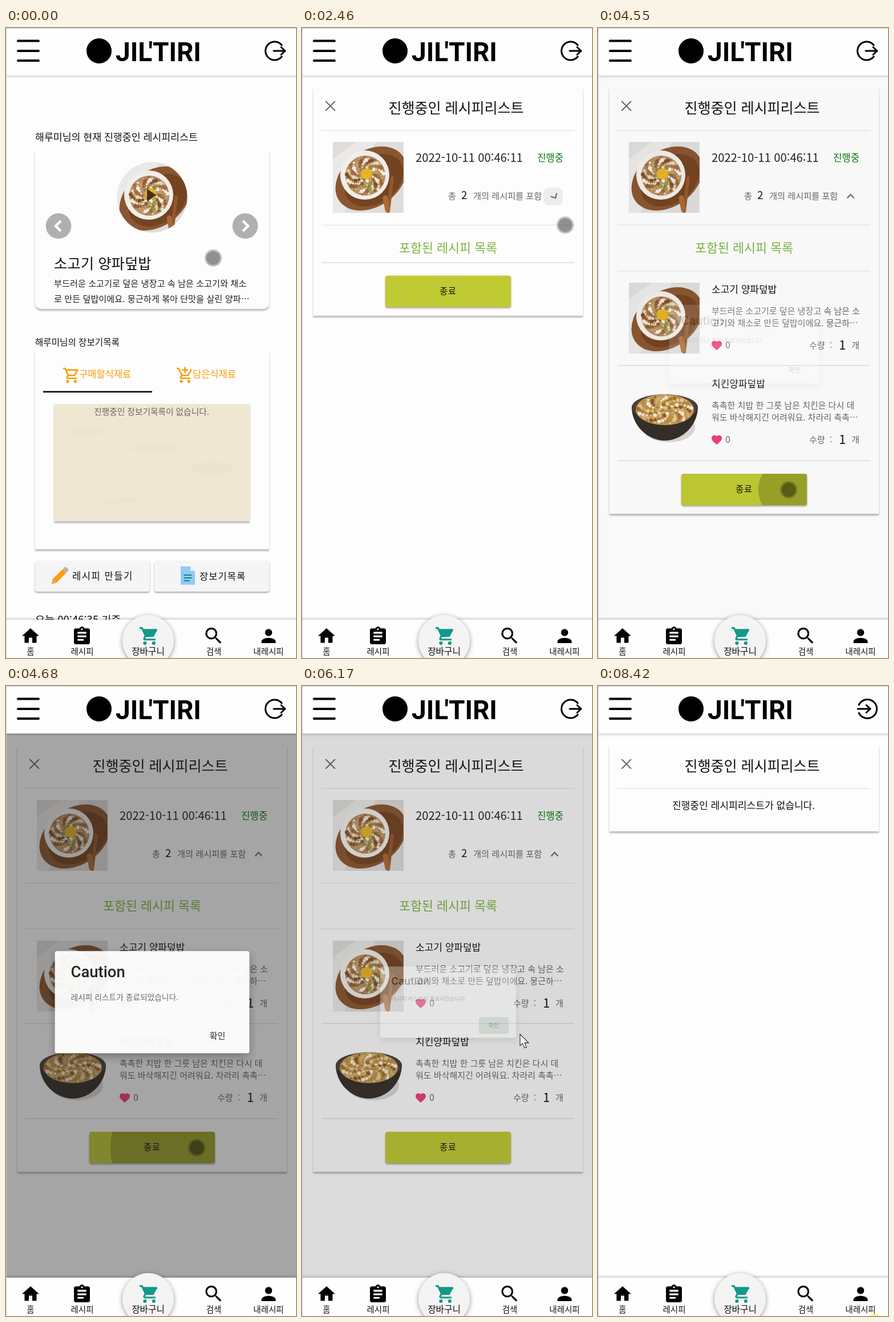
An HTML page for the animation above (8.49 s loop, 508x1101 px).

```html
<!DOCTYPE html>
<html lang="ko">
<head>
<meta charset="utf-8">
<title>레시피 리스트</title>
<style>
html, body { margin: 0; width: 100%; height: 100%; overflow: hidden; background: #fefefe }
svg { position: fixed; left: 0; top: 0; display: block }
text { font-family: "Noto Sans CJK KR", "Noto Sans CJK", sans-serif; font-weight: 300; white-space: pre }
.card { fill: #fdfdfd; filter: drop-shadow(0 3px 1.5px rgba(0,0,0,.28)) }
.btn { filter: drop-shadow(0 2px 1.5px rgba(0,0,0,.35)) }
.bar { fill: #fefefe; filter: drop-shadow(0 0 3px rgba(0,0,0,.35)) }
.line { fill: none; stroke: #000; stroke-linecap: round; stroke-linejoin: round }
#touch { mix-blend-mode: multiply }
</style>
</head>
<body>
<svg id="stage" width="508" height="1101" viewBox="0 0 508 1101"></svg>
<script>
const wheels = 'M7 18a2 2 0 1 0 0 4 2 2 0 0 0 0-4zM17 18a2 2 0 1 0 0 4 2 2 0 0 0 0-4z';
const icons = {
  home: 'M10 20v-6h4v6h5v-8h3L12 3 2 12h3v8z',
  clip: 'M19 3h-4.18C14.4 1.84 13.3 1 12 1s-2.4.84-2.82 2H5c-1.1 0-2 .9-2 2v14c0 1.1.9 2 2 2h14c1.1 0 2-.9 2-2V5c0-1.1-.9-2-2-2zm-7 0c.55 0 1 .45 1 1s-.45 1-1 1-1-.45-1-1 .45-1 1-1zm2 14H7v-2h7v2zm3-4H7v-2h10v2zm0-4H7V7h10v2z',
  cart: 'M1 2v2h2l3.6 7.59-1.35 2.45c-.16.28-.25.61-.25.96 0 1.1.9 2 2 2h12v-2H7.42c-.14 0-.25-.11-.25-.25l.03-.12.9-1.63h7.45c.75 0 1.41-.41 1.75-1.03l3.58-6.49A1 1 0 0 0 20 4H5.21l-.94-2H1z' + wheels,
  cartLine: 'M15.55 13c.75 0 1.41-.41 1.75-1.03l3.58-6.49A1 1 0 0 0 20 4H5.21l-.94-2H1v2h2l3.6 7.59-1.35 2.44C4.52 15.37 5.48 17 7 17h12v-2H7l1.1-2h7.45zM6.16 6h12.15l-2.76 5H8.53L6.16 6z' + wheels,
  cartPlus: 'M11 9h2V6h3V4h-3V1h-2v3H8v2h3v3zM7.17 14.75l.03-.12.9-1.63h7.45c.75 0 1.41-.41 1.75-1.03l3.86-7.01L19.42 4h-.01l-1.1 2-2.76 5H8.53l-.13-.27L6.16 6l-.95-2-.94-2H1v2h2l3.6 7.59-1.35 2.45c-.16.28-.25.61-.25.96 0 1.1.9 2 2 2h12v-2H7.42c-.13 0-.25-.11-.25-.25z' + wheels,
  search: 'M15.5 14h-.79l-.28-.27A6.47 6.47 0 0 0 16 9.5 6.5 6.5 0 1 0 9.5 16c1.61 0 3.09-.59 4.23-1.57l.27.28v.79l5 4.99L20.49 19l-4.99-5zm-6 0C7.01 14 5 11.99 5 9.5S7.01 5 9.5 5 14 7.01 14 9.5 11.99 14 9.5 14z',
  person: 'M12 12c2.21 0 4-1.79 4-4s-1.79-4-4-4-4 1.79-4 4 1.79 4 4 4zm0 2c-2.67 0-8 1.34-8 4v2h16v-2c0-2.66-5.33-4-8-4z',
  heart: 'M12 21.35l-1.45-1.32C5.4 15.36 2 12.28 2 8.5 2 5.42 4.42 3 7.5 3c1.74 0 3.41.81 4.5 2.09C13.09 3.81 14.76 3 16.5 3 19.58 3 22 5.42 22 8.5c0 3.78-3.4 6.86-8.55 11.54L12 21.35z'
};

const icon = (name, x, y, s, fill = '#000') =>
  `<path d="${icons[name]}" transform="translate(${x} ${y}) scale(${s})" fill="${fill}"/>`;
const text = (str, x, y, size, fill = '#111', more = '') =>
  `<text x="${x}" y="${y}" font-size="${size}" fill="${fill}" ${more}>${str}</text>`;
const mid = 'text-anchor="middle"';
const rect = (x, y, w, h, more = '') => `<rect x="${x}" y="${y}" width="${w}" height="${h}" ${more}/>`;
const circle = (x, y, r, more = '') => `<circle cx="${x}" cy="${y}" r="${r}" ${more}/>`;
const line = (d, width, color = '#000', cap = 'round') =>
  `<path class="line" d="${d}" style="stroke:${color};stroke-width:${width};stroke-linecap:${cap}"/>`;
const rule = (y, w = 1) => rect(34, y, 443, w, 'fill="#dedede"');
const use = (id, x, y) => `<use href="#${id}" x="${x}" y="${y}"/>`;

// Scattered toppings inside a bowl, from the golden angle
const bits = (cx, cy, rx, ry, n, colors) => Array.from({ length: n }, (_, i) => {
  const a = i * 2.4, d = Math.sqrt((i + .5) / n);
  return circle((cx + rx * d * Math.cos(a)).toFixed(1), (cy + ry * d * Math.sin(a)).toFixed(1),
    1.2 + i % 4 * .7, `fill="${colors[i % colors.length]}"`);
}).join('');

const defs = `<defs>
<clipPath id="square">${rect(0, 0, 124, 124)}</clipPath>
<clipPath id="disc">${circle(256, 296, 61.5)}</clipPath>
<clipPath id="more">${rect(20, 344, 472, 0, 'id="moreBox"')}</clipPath>
<clipPath id="endClip">${rect(146, 367, 220, 55, 'rx="4"')}</clipPath>
<clipPath id="cardClip">${rect(51, 208, 410, 283, 'rx="10"')}</clipPath>
<g id="rice" clip-path="url(#square)">
${rect(0, 0, 124, 124, 'fill="#dedddb"')}
<path d="M0 30L40 0H75L20 124H0z" fill="#eae9e7"/>
<ellipse cx="67" cy="64" rx="68" ry="49" transform="rotate(-35 67 64)" fill="#8a5631"/>
<ellipse cx="72" cy="67" rx="56" ry="40" transform="rotate(-35 72 67)" fill="#744322"/>
${circle(56, 58, 43, 'fill="#f1eee8"')}${circle(57, 59, 35, 'fill="#b08a62"')}
${bits(57, 59, 33, 33, 130, ['#f2e7d3', '#7d4e2d', '#e6d3b3', '#a06b3d', '#f4ecdd', '#c59a68', '#8f5c36'])}
${bits(60, 64, 20, 22, 14, ['#8fa03a'])}
${circle(59, 56, 10, 'fill="#e6b325"')}
${line('M104 62L97 121', 6, '#94582b')}${line('M92 98L96 119', 9, '#a96a38')}
</g>
<g id="chicken">
<ellipse cx="70" cy="88" rx="46" ry="26" fill="#dad8d5"/>
<path d="M5 52C5 84 32 111 63 111S121 84 121 52z" fill="#352f2a"/>
<ellipse cx="63" cy="53" rx="58" ry="23" fill="#4b4037"/>
<ellipse cx="63" cy="57" rx="51" ry="27" fill="#c49a58"/>
${bits(63, 57, 48, 25, 130, ['#f2e9d2', '#a8702f', '#e5cf98', '#c08a3c', '#f5edda', '#8c5a26', '#d8b46a'])}
</g>
</defs>`;

const arrowButton = (x, d) => circle(x, 346, 22.3, 'fill="#b0b0b0"') + line(d, 4.5, '#fff', 'butt');

const home = `<g id="home">
${text('해루미님의 현재 진행중인 레시피리스트', 51, 197, 17.3)}
${rect(51, 208, 410, 283, 'rx="10" class="card"')}
<g clip-path="url(#disc)">${use('rice', 194, 234)}</g>
<path d="M247 281L263 292 247 303z" fill="#4a2d18"/>
${arrowButton(92, 'M96 337L87 346 96 355')}${arrowButton(419, 'M415 337L424 346 415 355')}
${text('소고기 양파덮밥', 84, 421, 25.4)}
${text('부드러운 소고기로 덮은 냉장고 속 남은 소고기와 채소', 84, 452, 15.2, '#222')}
${text('로 만든 덮밥이에요. 뭉근하게 볶아 단맛을 살린 양파…', 84, 479, 15.2, '#222')}
<g clip-path="url(#cardClip)">${circle(328, 430, 0, 'id="tap"')}</g>
${text('해루미님의 장보기목록', 51, 555, 15.6)}
${rect(51, 565, 410, 346, 'class="card"')}
${icon('cartLine', 98.7, 591, 1.33, '#fb9c06')}${text('구매할식재료', 128, 611, 16.5, '#fb9c06')}
${icon('cartPlus', 297.7, 591, 1.33, '#fb9c06')}${text('담은식재료', 327, 611, 16.5, '#fb9c06')}
${rect(65, 634.5, 191, 2.5)}
${rect(84.5, 657, 342, 205, 'class="card" style="fill:#efe7d1"')}
<g fill="#e9dfc5" opacity=".35"><ellipse cx="140" cy="705" rx="30" ry="9"/><ellipse cx="360" cy="770" rx="38" ry="12"/>
<ellipse cx="205" cy="826" rx="34" ry="4" transform="rotate(-8 205 826)"/><ellipse cx="260" cy="735" rx="42" ry="10"/></g>
${text('진행중인 장보기목록이 없습니다.', 255, 676, 14.7, '#666', mid)}
<g class="btn" fill="#f5f5f5">${rect(51, 931, 201, 54, 'rx="4"')}${rect(260, 931, 201, 54, 'rx="4"')}</g>
<g transform="translate(80 972) rotate(-45)">${rect(7, -5, 25, 9, 'fill="#ff9d0a"')}${rect(32, -5, 7, 9, 'rx="2" fill="#b5b5b5"')}<path d="M0-.5L7-5V4z" fill="#d8a878"/></g>
${text('레시피 만들기', 116, 964, 16.6, '#111', 'letter-spacing="1.5"')}
<path d="M306 941h17l8 8v24h-25z" fill="#90caf9"/><path d="M323 941l8 8h-8z" fill="#e1f0fd"/>
${line('M312 956h13M312 961h13M312 966h9', 1.8, '#15897d')}
${text('장보기목록', 339, 964, 16.4, '#111', 'letter-spacing="1.2"')}
${text('오늘 00:46:35 기준', 51, 1041, 18.5)}
</g>`;

const item = (y, pic, name, a, b) => `<g transform="translate(0 ${y})">
${use(pic, 54, 21)}
${text(name, 199, 39, 17)}
${text(a, 199, 76, 15, '#666')}${text(b, 199, 97, 15, '#666')}
${icon('heart', 197.2, 120, .9, '#ec407a')}${text('0', 223, 136, 16, '#666')}
${text('수량 :', 370, 136, 15, '#666', 'word-spacing="4"')}${text('1', 422, 138, 22)}${text('개', 444, 136, 15, '#666')}
</g>`;

const list = `<g id="list">
${rect(20, 104, 472, 333, 'id="listCard" class="card"')}
${line('M42 128.500L57.500 144M57.500 128.500L42 144', 2, '#666')}
${text('진행중인 레시피리스트', 270, 149, 25, '#111', mid)}
${rule(178.5)}
<g id="empty">${text('진행중인 레시피리스트가 없습니다.', 255, 215, 17.1, '#111', mid)}</g>
<g id="filled">
${use('rice', 54, 199)}
${text('2022-10-11 00:46:11', 199, 234, 20.2, '#222')}
${text('진행중', 412, 233, 16.7, '#0a7a12', 'style="font-weight:400"')}
${text('총', 256, 299, 15, '#666')}${text('2', 279, 299, 18.5)}${text('개의 레시피를 포함', 300, 299, 15.2, '#666')}
${rect(423, 279, 34, 31, 'id="focus" rx="9" fill="#ededed"')}
<g id="chevron">${line('M436.500 291L442.500 297.500 448.500 291', 2.4, '#757575', 'butt')}</g>
<g clip-path="url(#more)">
${rule(343.5, 1.5)}
${text('포함된 레시피 목록', 256, 392, 21.7, '#7cb342', mid)}
${rule(424)}
${item(424, 'rice', '소고기 양파덮밥', '부드러운 소고기로 덮은 냉장고 속 남은 소', '고기와 채소로 만든 덮밥이에요. 뭉근하…')}
${rule(589, 1.5)}
${item(589, 'chicken', '치킨양파덮밥', '촉촉한 치밥 한 그릇 남은 치킨은 다시 데', '워도 바삭해지긴 어려워요. 차라리 촉촉…')}
</g>
<g id="foot">
${rule(343.5, 1.5)}
${rect(146, 367, 220, 55, 'rx="4" class="btn" fill="#c0ca33"')}
<g clip-path="url(#endClip)">${circle(334, 395, 0, 'id="ripple"')}</g>
${text('종료', 256, 399, 15, '#111', mid + ' letter-spacing="1"')}
</g>
</g>
</g>`;

const dialog = `${rect(0, 83, 508, 952, 'id="shade" fill="#212121"')}
<g id="dialog">
${rect(85, 463, 342, 179, 'rx="4" fill="#fff" style="filter:drop-shadow(0 6px 8px rgba(0,0,0,.3))"')}
${text('Caution', 113, 509, 27.6, '#222', 'style="font-family:Roboto,sans-serif;font-weight:500"')}
${text('레시피 리스트가 종료되었습니다.', 113, 549, 13.8, '#666')}
${rect(333, 590, 75, 42, 'id="pressed" rx="5" fill="#b5d0b8"')}
${text('확인', 371, 617, 15, '#222', mid)}
</g>`;

const chrome = `${rect(-5, -5, 518, 88, 'class="bar"')}
${line('M21 22.500H57M21 40H57M21 57H57', 4)}
${circle(163, 40, 22)}
${text("JIL'TIRI", 192, 58, 46, '#000', 'style="font-family:Roboto,sans-serif;font-weight:700"')}
<g id="logout">${line('M483 30A16 16 0 1 0 483 50M469 40H488M482 33.500L489 40 482 46.500', 3)}</g>
<g id="login">${line('M457 33A16.500 16.500 0 1 1 457 47M455 40H476M470 33.500L477 40 470 46.500', 3)}</g>
${rect(-5, 1034, 518, 75, 'class="bar"')}
${circle(249, 1071, 45, 'fill="#f4f4f4" style="filter:drop-shadow(0 2px 4px rgba(0,0,0,.4))"')}
${icon('home', 25, 1044.5, 1.5)}${icon('clip', 114.4, 1044.5, 1.55)}
<g id="cart">${icon('cart', 232.5, 1044, 1.55, '#12998a')}</g>
${icon('search', 344.5, 1043, 1.6)}${icon('person', 441.4, 1044, 1.55)}
${[['홈', 43], ['레시피', 133.5], ['장바구니', 249, 15.7], ['검색', 364], ['내레시피', 460]]
  .map(([s, x, size = 14.5]) => text(s, x, 1095, size, '#111', mid)).join('')}
<g id="status">${rect(-4, 1079, 173, 30, 'rx="4" fill="#e4e2df" opacity=".88"')}
${text('j7a705.q.ssafy.io의 ...', 5, 1099, 15.4, '#777')}</g>
${rect(0, 0, 508, 1, 'fill="#ccc"')}${rect(0, 0, 1, 1101, 'fill="#ccc"')}
${circle(485, 1108, 11, 'id="glow" fill="#fbf46a"')}
<g id="touch">${circle(0, 0, 15, 'fill="#c2c2c2"')}${circle(0, 0, 12, 'fill="#919191"')}</g>
<path id="pointer" d="M0 0V20L4.500 16 8 24 11.500 22.500 8 15H15z" fill="#fff" stroke="#222" stroke-width="1.100"/>`;

stage.innerHTML = defs + home + list + dialog + chrome;

const el = id => document.getElementById(id);
const set = (id, attrs) => { for (const k in attrs) el(id).setAttribute(k, attrs[k]); };
const show = (id, on) => set(id, { opacity: +on });
const ramp = (t, a, b) => Math.min(1, Math.max(0, (t - a) / (b - a)));
const ease = (t, a, b) => { const p = ramp(t, a, b); return p * p * (3 - 2 * p); };

const LOOP = 8490;
// time, x, y
const path = [
  [0, 363, 402], [70, 363, 402], [150, 358, 396], [340, 328, 430], [720, 328, 430],
  [1410, 473, 334], [1470, 472, 332], [1670, 456, 300], [1860, 456, 300], [2130, 455, 299],
  [2400, 455, 299], [2750, 490, 560], [3160, 430, 746], [3360, 417, 792], [3620, 405, 800],
  [3850, 405, 800], [4110, 334, 807], [4750, 334, 807], [5310, 386, 612], [5450, 382, 609],
  [6170, 382, 609], [6640, 356, 429], [7540, 356, 429], [7640, 345, 416], [8200, 500, 1101]
];

function cursor(t) {
  const i = path.findIndex(p => p[0] > t);
  if (i < 0) return path[path.length - 1].slice(1);
  const [a, x, y] = path[i - 1], [b, u, v] = path[i], p = ramp(t, a, b);
  return [x + (u - x) * p, y + (v - y) * p];
}

function draw(t) {
  const onList = t >= 900, ended = t >= 6970;
  show('home', !onList);
  show('list', onList);
  show('filled', !ended);
  show('empty', ended);
  show('logout', !ended);
  show('login', ended);
  show('cart', t < 6970 || t >= 7035);
  show('status', t >= 1200 && t < 1475);
  show('glow', t >= 8415);
  set('tap', { r: 330 * ease(t, 640, 900), opacity: .1 });

  const open = ease(t, 2380, 2700);
  set('listCard', { height: ended ? 150 : 333 + 412 * open });
  set('moreBox', { height: 412 * open });
  set('foot', { transform: `translate(0 ${412 * open})` });
  set('chevron', { transform: `rotate(${-180 * open} 442.5 294.2)` });
  show('focus', t >= 2330 && t < 4480);
  set('ripple', { r: Math.max(0, Math.min(230, (t - 4480) * .75)), opacity: .2 * (1 - ramp(t, 4800, 5100)) });

  set('shade', { opacity: .46 * (ease(t, 4526, 4726) - ease(t, 6050, 6250)) });
  const rise = 1 - (1 - ramp(t, 4500, 4725)) ** 3;
  const scale = .5 + .5 * (rise - ramp(t, 6080, 6230));
  set('dialog', {
    opacity: ease(t, 4500, 4710) - ease(t, 6070, 6230),
    transform: `translate(${256 * (1 - scale)} ${552.5 * (1 - scale)}) scale(${scale})`
  });
  show('pressed', t >= 6040);

  const at = `translate(${cursor(t)})`;
  set('touch', { transform: at, opacity: +(t < 5445) });
  set('pointer', { transform: at, opacity: +(t >= 5445 && t < 8200) });
}

const start = performance.now();
function tick() {
  draw((performance.now() - start) % LOOP);
  requestAnimationFrame(tick);
}
tick();
</script>
</body>
</html>
```
